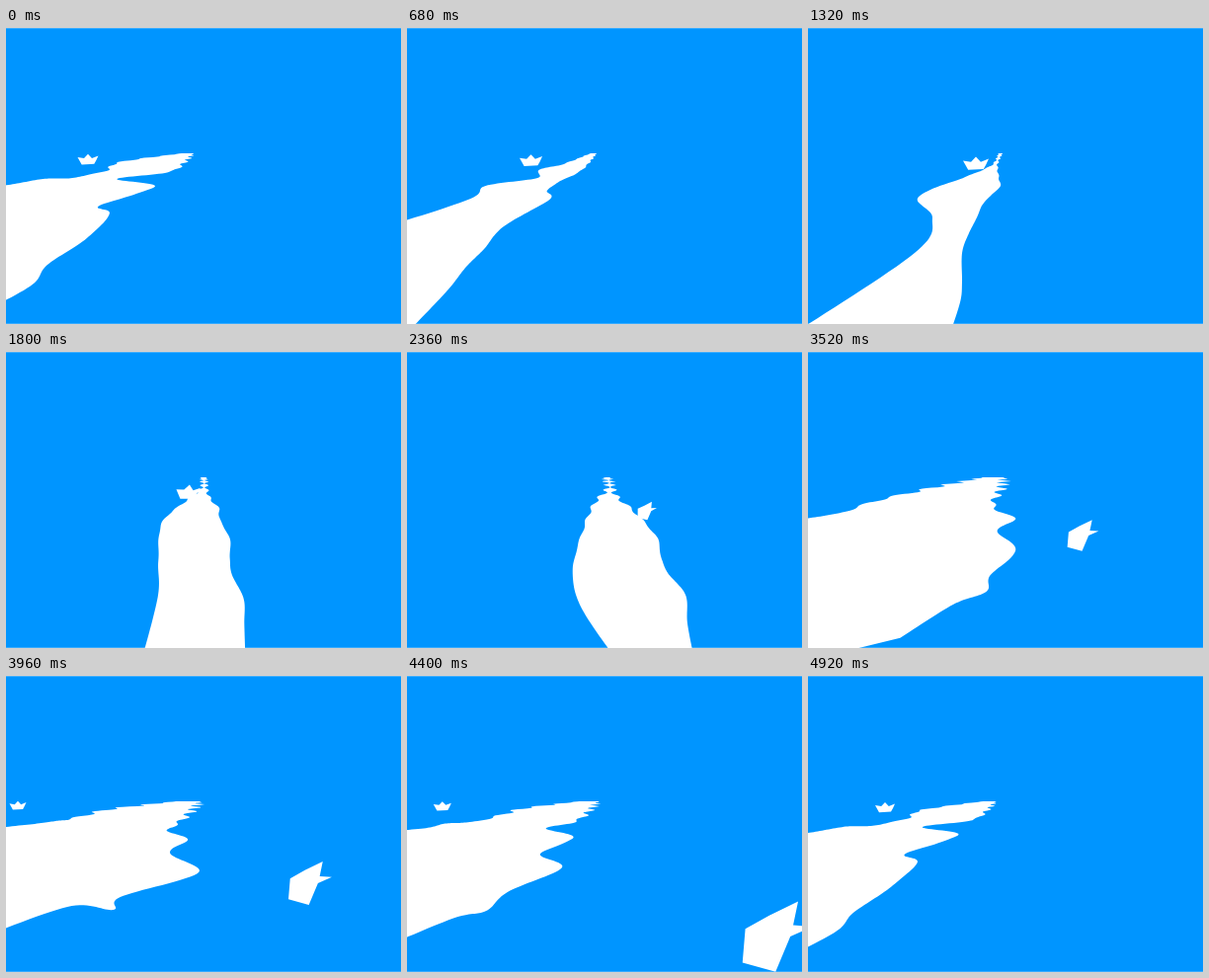
These frames come from a looping animation (400 by 300 pixels, 4.96 s). An HTML page:

```html
<!DOCTYPE html>
<html lang="en">
<head>
<meta charset="utf-8">
<title>Paper boat</title>
<style>
html, body { margin: 0; width: 100%; height: 100%; overflow: hidden; background: #0095ff; }
svg { display: block; width: 100vw; height: 100vh; fill: #fff; }
</style>
</head>
<body>
<svg viewBox="0 0 400 300">
  <path d="M0 0H400V1H0ZM0 299H400V300H0Z" opacity=".2"/>
  <path id="river"/>
  <path id="near"/>
  <path id="far"/>
</svg>
<script>
const LOOP = 4960, STEP = 40, HORIZON = 127, TAU = 2 * Math.PI;

const points = s => s.split(' ').map(p => p.split(',').map(Number));

// Broad bends of both banks, from the horizon towards the viewer.
const bend = (time, power, left, right) =>
  ({ time, power, left: points(left), right: points(right) });
const wide = [
  '178,127 115,136 100,145 66,152 36,153 4,159 -30,162',
  '190,127 180,137 165,146 114,153 150,161 95,180 105,188 82,213 42,240 24,262 -40,296'];
const river = [
  bend(0, 1, ...wide),
  bend(680, 1,
    '186,127 158,138 133,144 132,152 80,160 62,174 -30,204',
    '192,127 184,137 174,146 152,157 142,165 144,174 98,201 78,224 60,242 40,267 0,309'),
  bend(1320, 1.8,
    '193,127 186,139 162,150 112,171 126,193 108,228 -15,310',
    '197,127 192,138 193,151 194,161 178,177 172,190 163,208 156,228 156,258 154,278 143,312'),
  bend(2360, 1,
    '199,127 203,138 190,153 180,175 168,220 176,258 212,312',
    '206,127 209,140 214,148 226,158 236,168 253,188 258,210 264,224 282,246 284,275 291,312'),
  bend(3000, 1,
    '184,127 137,142 107,151 66,159 46,173 0,186 -30,190',
    '202,127 206,139 206,149 216,160 238,172 223,186 230,202 266,229 266,250 247,282 251,312'),
  bend(3960, 1,
    '172,127 120,133 95,137 66,145 46,147 22,151 -30,156',
    '197,127 188,137 176,148 165,156 183,167 165,180 195,199 116,224 108,237 62,234 -40,271'),
  bend(4985, 1, ...wide)];

// The boat seen from the front and from the side, one unit wide.
const front = points('-.5,-.1 -.19,-.05 0,-.25 .19,-.05 .5,-.17 .4,.05 .3,.23 -.3,.26');
const side = points('-.46,-.11 -.12,-.3 .29,-.5 .22,-.16 .5,-.14 .18,0 -.03,.5 -.5,.37');
const key = (time, x, y, size, turn) => ({ time, x, y, size, turn });
const course = [
  key(-1300, -9, 130, 14, 0),
  key(-1000, 12, 131, 17, 0),
  key(-40, 78, 133, 20, 0),
  key(0, 83, 133, 21, 0),
  key(680, 125.5, 134, 23, 0),
  key(1320, 170, 137, 26, 0),
  key(2360, 243, 161, 20, 0.85),
  key(3000, 260, 171, 24, 1),
  key(3960, 308, 210, 44, 1),
  key(4760, 570, 420, 150, 1)];

const lerp = (a, b, u) => a + (b - a) * u;
const blend = (a, b, u) => a.map(([x, y], i) => [lerp(x, b[i][0], u), lerp(y, b[i][1], u)]);
const path = pts => 'M' + pts.map(([x, y]) => x.toFixed(2) + ' ' + y.toFixed(2)).join('L') + 'Z';

function span(keys, t) {
  let i = 0;
  while (i < keys.length - 2 && t >= keys[i + 1].time) i++;
  const a = keys[i], b = keys[i + 1];
  return [a, b, (t - a.time) / (b.time - a.time)];
}

// Catmull-Rom curve through the points.
function curve(pts, n = 16) {
  const at = i => pts[Math.min(pts.length - 1, Math.max(0, i))];
  const out = [];
  for (let i = 0; i < pts.length - 1; i++) {
    const [p, a, b, q] = [at(i - 1), at(i), at(i + 1), at(i + 2)];
    for (let j = 0; j < n; j++) {
      const u = j / n;
      out.push([0, 1].map(k => a[k] + u / 2 * (b[k] - p[k]
        + u * (2 * p[k] - 5 * a[k] + 4 * b[k] - q[k]
        + u * (3 * (a[k] - b[k]) + q[k] - p[k])))));
    }
  }
  return [...out, at(pts.length - 1)];
}

// Ripples drift towards the viewer, packed closer near the horizon.
function ripple(pts, t, sign) {
  const turn = TAU * t / LOOP;
  const chop = 5 - 4 * Math.cos(turn - 1.25);
  return pts.map(([x, y]) => {
    const d = Math.max(0, y - HORIZON);
    const size = chop * Math.min(1, d / 3) * Math.exp(-d / 30);
    return [x + sign * size * Math.sin(18 * Math.log(d + 4) - 8 * turn), y];
  });
}

function water(t) {
  const [a, b, v] = span(river, t);
  const u = 1 - (1 - v) ** a.power;
  const left = ripple(curve(blend(a.left, b.left, u)), t, -1);
  const right = ripple(curve(blend(a.right, b.right, u)), t, 1);
  const corner = [left[left.length - 1][0], 320];
  return path([corner, ...left.reverse(), ...right]);
}

// Steady approach in depth speeds up on screen.
function boat(t) {
  const [a, b, v] = span(course, t);
  const r = (a.y - HORIZON) / (b.y - HORIZON);
  const u = r * v / (1 - (1 - r) * v);
  const at = name => lerp(a[name], b[name], u);
  return path(blend(front, side, at('turn'))
    .map(([x, y]) => [at('x') + x * at('size'), at('y') + y * at('size')]));
}

const draw = (id, d) => document.getElementById(id).setAttribute('d', d);

function frame() {
  const t = Math.floor(performance.now() % LOOP / STEP) * STEP;
  draw('river', water(t));
  draw('near', boat(Math.min(t, 4760)));
  draw('far', boat(Math.max(t - LOOP, -1300)));
  requestAnimationFrame(frame);
}
frame();
</script>
</body>
</html>
```
